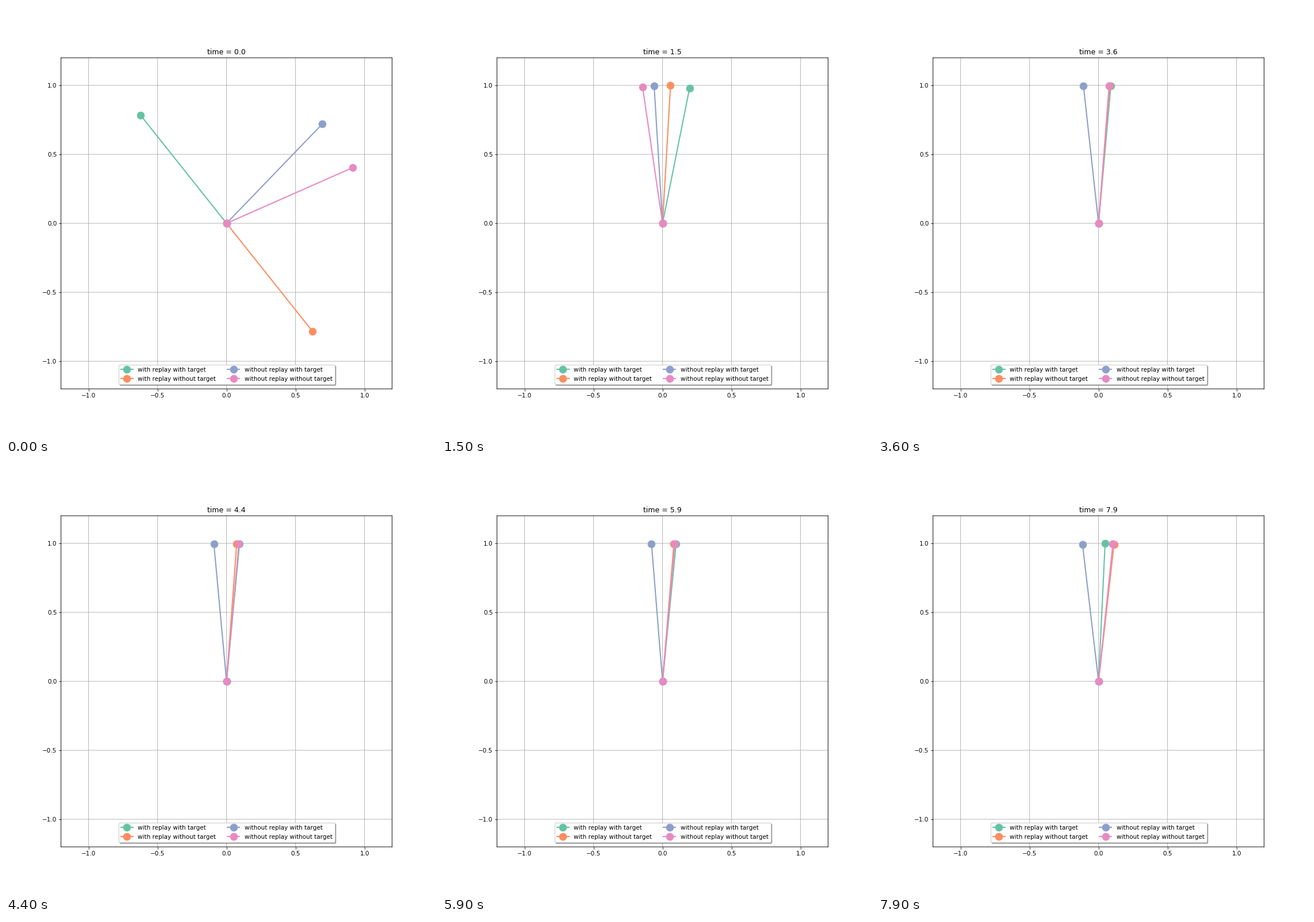
Animation, 748 px wide and 748 px high, one loop 8 s. Source, as a matplotlib script:

```python
import numpy as np
import matplotlib.pyplot as plt
from matplotlib.animation import FuncAnimation

FRAMES, STEP = 80, 0.1
TURN = 2 * np.pi

# Angles in radians, clockwise from upright; times in seconds.
# fall, sharp: scale and shape of the swing-up
# rest, drift, sway, period, peak: slow wander around the balance point
ARMS = [
    dict(label="with replay with target", color="#66c2a5",
         start=-0.672, fall=0.731, sharp=2.174, rest=0.093 - TURN,
         drift=-0.0116, sway=0.02, period=3.7, peak=5.5),
    dict(label="with replay without target", color="#fc8d62",
         start=np.pi - 0.672, fall=0.357, sharp=1.3, rest=0.083,
         drift=0.0068, sway=0.012, period=4.5, peak=2.95),
    dict(label="without replay with target", color="#8da0cb",
         start=0.767, fall=0.742, sharp=1.6, rest=-0.098,
         drift=0, sway=0.02, period=5.5, peak=5.5),
    dict(label="without replay without target", color="#e78ac3",
         start=1.155, fall=1.0046, sharp=2.83, rest=0.09 + TURN,
         drift=0, sway=0.014, period=2.85, peak=2.3),
]


def angle(arm, t):
    """Ease from the start angle into a gentle sway near upright."""
    rest = (arm["rest"] + arm["drift"] * (t - 5)
            + arm["sway"] * np.cos(TURN * (t - arm["peak"]) / arm["period"]))
    left = np.exp(-(t / arm["fall"]) ** arm["sharp"])
    return rest + (arm["start"] - rest) * left


fig, ax = plt.subplots(figsize=(10, 10), dpi=74.8)
nudge = 0.0004
fig.subplots_adjust(left=0.125 + nudge, right=0.9 + nudge,
                    bottom=0.11 - nudge, top=0.88 - nudge)
ax.set_aspect("equal")
ax.set(xlim=(-1.2, 1.2), ylim=(-1.2, 1.2))
ticks = np.arange(-1, 1.1, 0.5)
ax.set_xticks(ticks)
ax.set_yticks(ticks)
ax.grid(True)
title = ax.set_title("time = 0.0")

# Soft, unsnapped frame and grid
for edge in [*ax.get_xgridlines(), *ax.get_ygridlines(), *ax.spines.values()]:
    edge.set_snap(False)
    edge.set_linewidth(0.9)

lines = [ax.plot([], [], "o-", lw=2, ms=12,
                 color=arm["color"], label=arm["label"])[0] for arm in ARMS]
ax.legend(loc="lower center", bbox_to_anchor=(0.5, 0.005), ncol=2,
          labelspacing=0.58, fancybox=True, shadow=True)


def draw(frame):
    t = frame * STEP
    for line, arm in zip(lines, ARMS):
        a = angle(arm, t)
        line.set_data([0, np.sin(a)], [0, np.cos(a)])
    title.set_text(f"time = {t:.1f}")
    return [*lines, title]


anim = FuncAnimation(fig, draw, frames=FRAMES, interval=100,
                     repeat=True, repeat_delay=0, blit=False)
plt.show()
```
